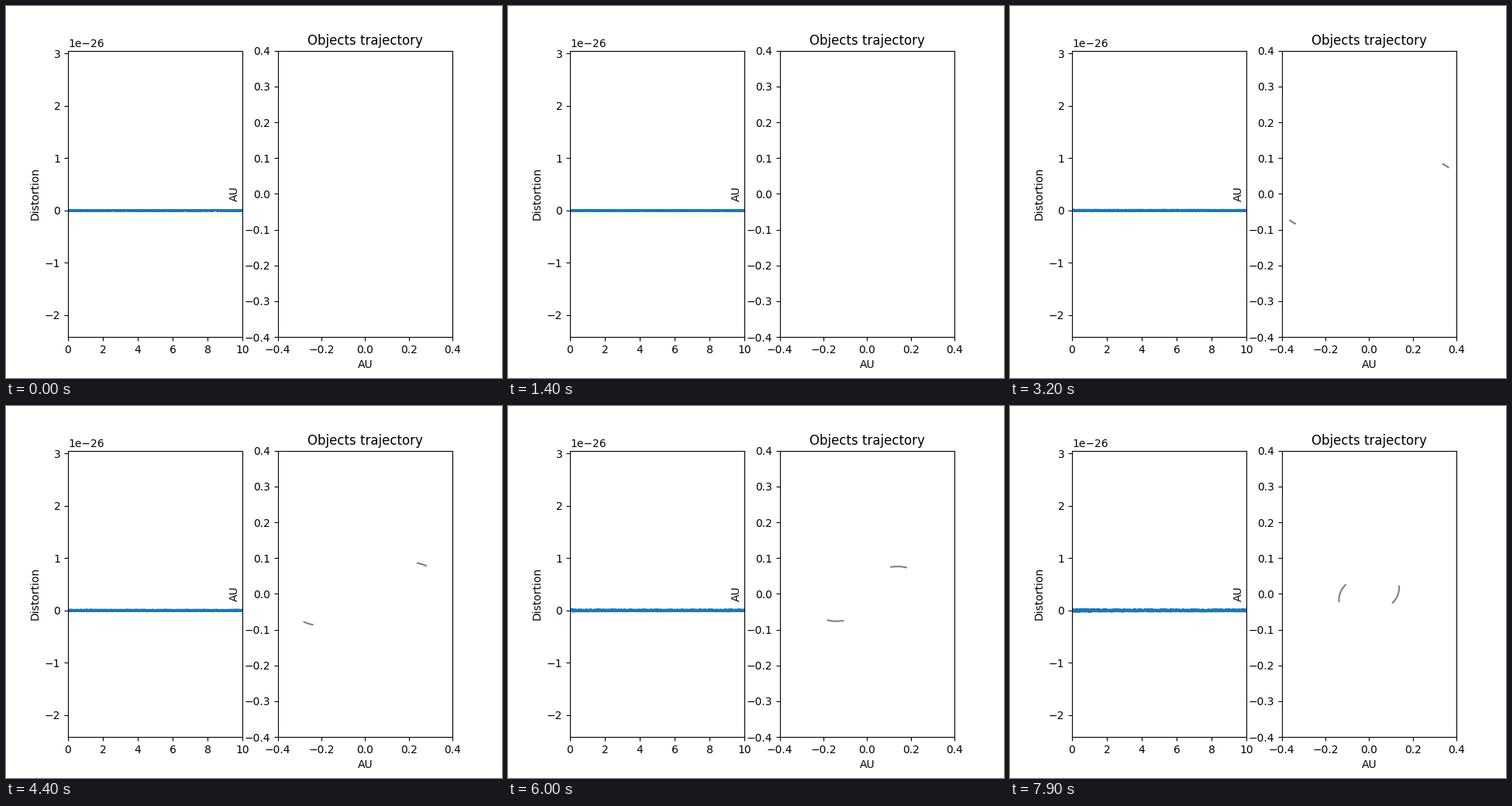
Animation, 640 px wide and 480 px high, one loop 8 s. Source, as a matplotlib script:

```python
import numpy as np
import matplotlib.pyplot as plt
from matplotlib.animation import FuncAnimation

FRAMES, INTERVAL = 80, 100
MERGER = 92.8      # step at which the orbit would close
LATUS = 0.0315     # semi-latus rectum, AU
SCALE = 1e-26


def turns(i):
    """Orbits completed: the period shrinks linearly, with slow drifts."""
    chirp = 0.81 - 14 * np.log(1 - i / MERGER)
    swing = np.sin(np.pi * np.clip((i - 44) / 35, 0, 1))
    return chirp + 0.02 * max(0, 32 - i) - 0.476 * swing


def eccentric_anomaly(m, e):
    """Solve Kepler's equation by bisection."""
    lo, hi = m - 1, m + 1
    for _ in range(40):
        mid = (lo + hi) / 2
        if mid - e * np.sin(mid) < m:
            lo = mid
        else:
            hi = mid
    return (lo + hi) / 2


def trail(i):
    """Latest stretch of one body's path around the shared focus."""
    left = 1 - i / MERGER
    a = 0.28 * left ** (2 / 3)
    e = np.sqrt(1 - LATUS / a)
    tilt = np.radians(4.2 + 0.0025 * left ** -4)
    m = 2 * np.pi * turns(i)
    sweep = 0.18 * left ** -1.15
    ecc = np.linspace(eccentric_anomaly(m - sweep, e), eccentric_anomaly(m, e), 120)
    u = a * (e - np.cos(ecc))
    v = -a * np.sqrt(1 - e * e) * np.sin(ecc)
    return (u * np.cos(tilt) - v * np.sin(tilt),
            u * np.sin(tilt) + v * np.cos(tilt))


dist = np.linspace(0, 10, 1600)


def strain(i, nearest):
    """Rapid ripple that bursts when the bodies pass close by."""
    rng = np.random.default_rng(100 + i)
    noise = 0.013 + 0.008 * i / FRAMES
    burst = 0.18 * (0.0165 / nearest) ** 1.8
    wobble = np.sin(rng.uniform(0, 2 * np.pi, dist.size))
    return SCALE * (noise + burst / (1 + dist)) * wobble


fig, (wave_ax, path_ax) = plt.subplots(1, 2, figsize=(6.4, 4.8), dpi=100)

wave_ax.set_xlim(0, 10)
wave_ax.set_ylim(-2.419 * SCALE, 3.0546 * SCALE)
wave_ax.set_ylabel("Distortion")
wave, = wave_ax.plot([], [], color="C0")

path_ax.set_xlim(-0.4, 0.4)
path_ax.set_ylim(-0.4, 0.4)
path_ax.set_title("Objects trajectory", pad=5.3)
path_ax.set_xlabel("AU")
path_ax.set_ylabel("AU")
body_a, = path_ax.plot([], [], color="gray")
body_b, = path_ax.plot([], [], color="gray")


def update(i):
    x, y = trail(i)
    body_a.set_data(x, y)
    body_b.set_data(-x, -y)
    wave.set_data(dist, strain(i, np.hypot(x, y).min()))
    return wave, body_a, body_b


anim = FuncAnimation(fig, update, frames=FRAMES, interval=INTERVAL,
                     repeat=True, repeat_delay=0, blit=False)
plt.show()
```
